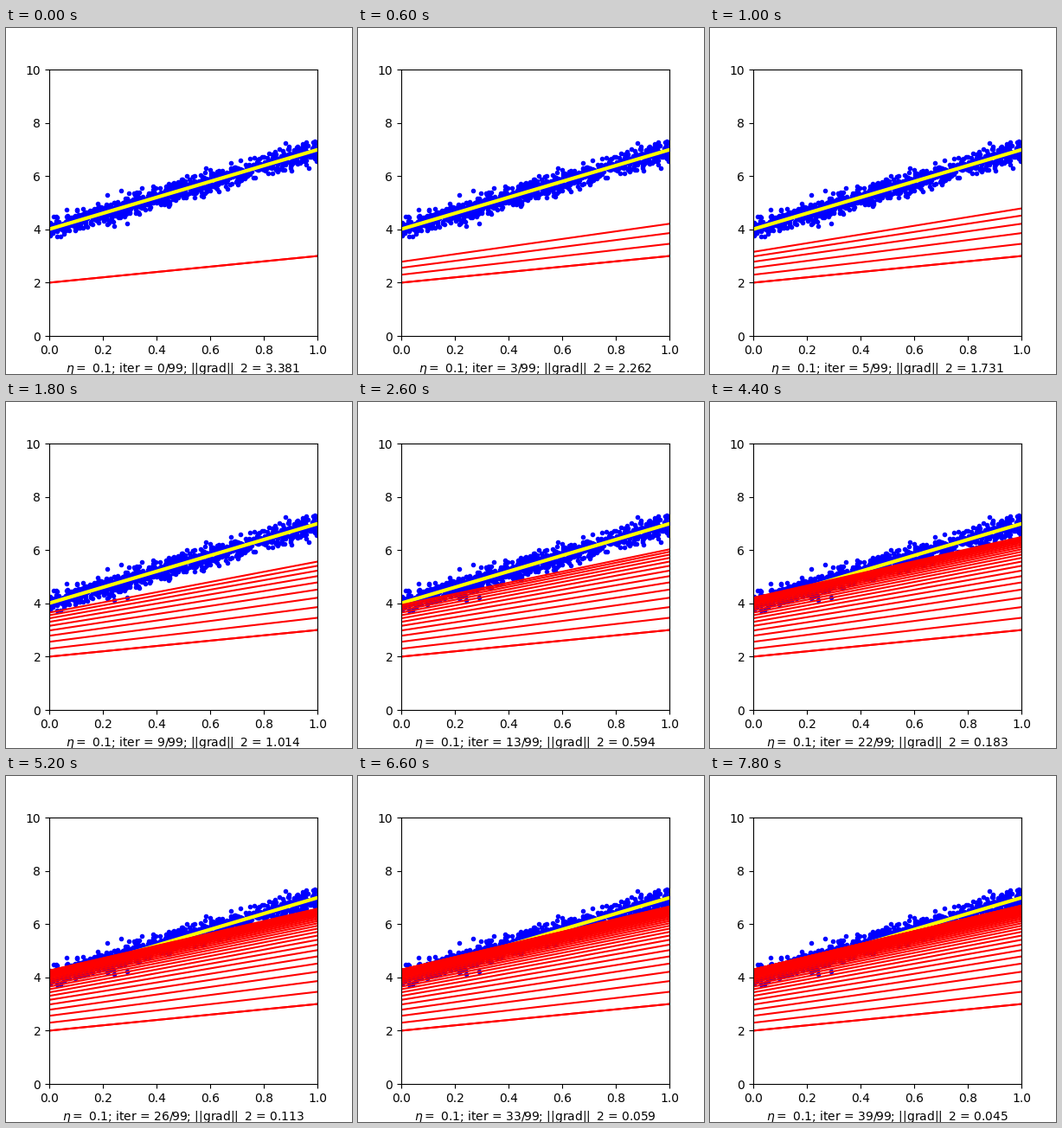
A matplotlib script for the animation above (8000 ms loop, 400 by 400 pixels).

```python
import numpy as np
import matplotlib.pyplot as plt
from matplotlib.animation import FuncAnimation

FRAMES = 40
INTERVAL = 200
TOTAL = 99
ETA = 0.1

# Noisy samples around y = 4 + 3x
np.random.seed(2)
X = np.random.rand(1000)
Y = 4 + 3 * X + 0.2 * np.random.randn(1000)
A = np.column_stack([np.ones_like(X), X])


def grad(w):
    return A.T @ (A @ w - Y) / len(X)


def descend(w, steps):
    path = [np.array(w, float)]
    for _ in range(steps - 1):
        path.append(path[-1] - ETA * grad(path[-1]))
    return path


path = descend([2, 1], FRAMES)
norms = [np.linalg.norm(grad(w)) for w in path]
best = np.linalg.lstsq(A, Y, rcond=None)[0]

fig, ax = plt.subplots(figsize=(4, 4), dpi=100)
ends = np.linspace(0, 1, 2)


def draw_line(w, color, **style):
    return ax.plot(ends, w[0] + w[1] * ends, color, **style)[0]


ax.plot(X, Y, "b.")
draw_line(best, "yellow", linewidth=3)
draw_line(path[0], "red")  # the starting guess is drawn twice, so it looks heavier
lines = [draw_line(w, "red") for w in path]
ax.axis([0, 1, 0, 10])


def update(i):
    for k, line in enumerate(lines):
        line.set_visible(k <= i)
    ax.set_xlabel(rf"$\eta =$ {ETA}; iter = {i}/{TOTAL}; ||grad||_2 = {norms[i]:.3f}")
    return lines


def reset():
    return update(0)


anim = FuncAnimation(fig, update, frames=FRAMES, init_func=reset,
                     interval=INTERVAL, repeat=True, repeat_delay=0, blit=False)
plt.show()
```
